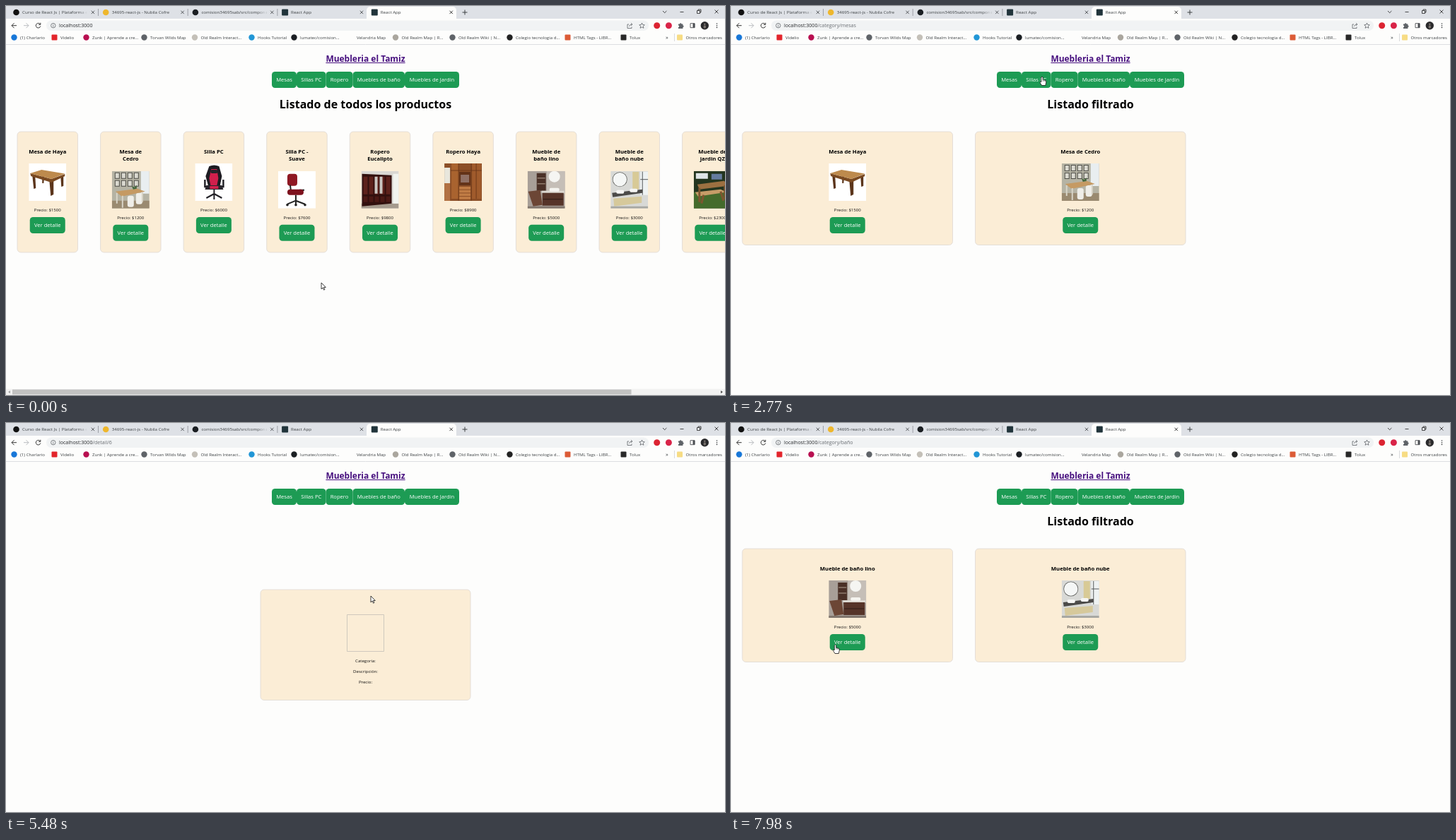
Recreate the animation shown at these times as an HTML page with a canvas. Size 1017 by 551 pixels, loop 8000 ms.

```html
<!DOCTYPE html>
<html lang="es">
<head>
<meta charset="utf-8">
<title>Tienda de muebles</title>
<style>
  html, body { margin: 0; width: 100%; height: 100%; overflow: hidden; background: #fdfdfc; }
  canvas { display: block; width: 1017px; height: 551px; }
</style>
</head>
<body>
<canvas id="stage"></canvas>
<script>
const W = 1017, H = 551, LOOP = 8000;
const canvas = document.getElementById('stage');
const ctx = canvas.getContext('2d');
const ratio = window.devicePixelRatio || 1;
canvas.width = W * ratio;
canvas.height = H * ratio;

const PAGE = '#fdfdfc', GREEN = '#1d9b54', CREAM = '#fbedd6', INK = '#3c4043';

// Drawing helpers
function box(color, x, y, w, h, r = 0) {
  ctx.fillStyle = color;
  ctx.beginPath();
  ctx.roundRect(x, y, w, h, r);
  ctx.fill();
}
function dot(color, x, y, r) {
  ctx.fillStyle = color;
  ctx.beginPath();
  ctx.arc(x, y, r, 0, Math.PI * 2);
  ctx.fill();
}
function shape(color, d) {
  ctx.fillStyle = color;
  ctx.fill(new Path2D(d));
}
function line(d, color = INK, width = 1) {
  ctx.strokeStyle = color;
  ctx.lineWidth = width;
  ctx.stroke(new Path2D(d));
}
// y is the middle of the capital letters
function text(str, x, y, size, { color = '#111', weight = 400, align = 'left' } = {}) {
  ctx.font = `${weight} ${size}px "Open Sans", "Noto Sans", sans-serif`;
  ctx.fillStyle = color;
  ctx.textAlign = align;
  ctx.fillText(str, x, y + size * 0.357);
  return ctx.measureText(str).width;
}
const centred = (str, x, y, size, weight = 400, color = '#111') =>
  text(str, x, y, size, { color, weight, align: 'center' });

// Product pictures on a 53 x 53 square
const photos = {
  table() {
    box('#fff', 0, 0, 53, 53);
    shape('#5b351b', 'M5 17l4 1 1 17-3 1zM29 23l6 0 0 21-4 2zM45 18l4-1 0 15-3 1zM19 18h3l-1 10h-2z');
    shape('#7a4a22', 'M2 14L32 22L51 15V18L32 27L3 18z');
    shape('#bd8a4d', 'M2 14L18 9L51 14.500L32 22z');
  },
  dining() {
    box('#b5b3a4', 0, 0, 53, 53);
    box('#e9eef0', 41, 0, 12, 32);
    for (let i = 0; i < 8; i++) {
      const x = 4 + i % 4 * 9, y = 2 + (i >> 2) * 11;
      box('#4e4d47', x, y, 7, 9);
      box('#dad9d0', x + 1, y + 1, 5, 7);
    }
    box('#9a8a70', 0, 42, 53, 11);
    box('#efeee8', 34, 31, 9, 16, 3);
    box('#efeee8', 22, 35, 9, 16, 3);
    shape('#c59a63', 'M5 29L36 25L47 29L14 36z');
    line('M15 35V52M7 31V46M43 30V44', '#d9d5c8', 2);
    shape('#46683e', 'M30 26l-2-5 4 2 3-3 0 5z');
  },
  gaming() {
    box('#fff', 0, 0, 53, 53);
    shape('#1d1c22', 'M20 4Q27 1 34 4L38 18L35 33H19L15 18z');
    shape('#d11f4c', 'M23 8H31L33 21L31 31H22L20 21z');
    box('#25242a', 22, 9, 10, 5, 2);
    line('M14 23V33H20M40 23V33H34', '#1d1c22', 2.4);
    shape('#2a272e', 'M16 31H38L40 37H14z');
    box('#d11f4c', 21, 32, 12, 4);
    line('M27 37V45M27 43L16 49M27 43L38 49M27 43V51', '#222127', 2);
  },
  office() {
    box('#fff', 0, 0, 53, 53);
    box('#8f1823', 13, 4, 14, 17, 4);
    line('M17 20L18 28M30 27H37', '#222', 2);
    box('#7d111d', 13, 26, 23, 8, 4);
    line('M25 34V43M25 42L13 47M25 42L38 47M25 42V49', '#222', 2);
    [13, 25, 38].forEach(x => dot('#222', x, 48, 1.8));
  },
  darkWardrobe() {
    box('#d9d7d2', 0, 0, 53, 53);
    box('#a59a8d', 0, 46, 53, 7);
    box('#f1f3ee', 45, 4, 8, 42);
    shape('#32100e', 'M1 4L43 6V46L1 50z');
    for (let i = 0; i < 5; i++) box('#5d211b', 3 + i * 8, 8, 6, 25);
    box('#c9c5c0', 19, 8, 4, 24);
    box('#c9c5c0', 26, 8, 4, 24);
    for (let i = 0; i < 5; i++) box('#4b1915', 3 + i * 8, 36, 6, 8);
  },
  pineWardrobe() {
    box('#8c4f27', 0, 0, 53, 53);
    box('#e8e6dc', 0, 6, 8, 22);
    box('#b27143', 0, 28, 8, 25);
    box('#a9632f', 10, 0, 10, 50);
    box('#a05b2c', 39, 0, 13, 50);
    box('#633319', 21, 12, 16, 19);
    box('#907065', 23, 16, 12, 11);
    for (let i = 0; i < 4; i++) box('#c07c45', 21, 33 + i * 4.7, 16, 3.7);
    line('M20 0V53M38 0V53M45 0V50M9 10H53', '#653417', 0.8);
  },
  brownBath() {
    box('#a89f98', 0, 0, 53, 53);
    box('#c5beb7', 27, 0, 26, 32);
    dot('#f5f5f2', 38, 8, 8);
    box('#4a3027', 13, 3, 13, 25);
    line('M14 10H25M14 18H25', '#8f7b6d', 1.5);
    box('#ddd9d2', 20, 28, 32, 3);
    box('#f4f3ef', 31, 24, 14, 5, 2);
    box('#563429', 21, 31, 30, 18);
    line('M22 40H50', '#2f1c17', 1);
    shape('#6c4635', 'M1 29L18 27L21 48L8 50z');
    box('#81766d', 0, 50, 53, 3);
  },
  lightBath() {
    box('#d8d9d6', 0, 0, 53, 53);
    box('#d8ca96', 31, 1, 9, 25);
    box('#eef2f2', 42, 1, 11, 33);
    line('M45 1V34M53 12H42', '#55585a', 1);
    dot('#62635f', 13, 12, 10.5);
    dot('#f5f7f6', 13, 12, 9.7);
    shape('#4c4b49', 'M2 31L45 26V31L3 37z');
    box('#f6f6f4', 8, 27, 11, 5, 2);
    box('#f6f6f4', 27, 25, 11, 5, 2);
    shape('#d6c99b', 'M4 39L44 36V45L5 50z');
    box('#a8a8a3', 0, 50, 53, 3);
  },
  garden() {
    box('#24351f', 0, 0, 53, 53);
    box('#446b2c', 0, 30, 53, 23);
    box('#dfe5e7', 3, 3, 17, 8);
    box('#657b9e', 25, 4, 15, 8);
    shape('#9c7041', 'M5 19L43 14L49 21L8 26z');
    shape('#c69c68', 'M2 30L38 26L47 30L6 36z');
    line('M8 24V44M44 20V40M14 34L11 46M38 29L42 42', '#7e5630', 3);
  }
};

const products = [
  ['Mesa de Haya', 1500, 'table'],
  ['Mesa de|Cedro', 1200, 'dining'],
  ['Silla PC', 6000, 'gaming'],
  ['Silla PC -|Suave', 7600, 'office'],
  ['Ropero|Eucalipto', 9800, 'darkWardrobe'],
  ['Ropero Haya', 8900, 'pineWardrobe'],
  ['Mueble de|baño lino', 5000, 'brownBath'],
  ['Mueble de|baño nube', 3000, 'lightBath'],
  ['Mueble de|jardin QZ', 2300, 'garden']
].map(([name, price, photo]) => ({ name, price, photo }));

const ALL = 'Listado de todos los productos', FILTERED = 'Listado filtrado';
const every = products.map((_, i) => i);
const views = [
  { at: 0, path: '', head: ALL, items: every },
  { at: 1670, path: '/category/mesas', head: FILTERED, items: every },
  { at: 2370, path: '/category/mesas', head: FILTERED, items: [0, 1] },
  { at: 2800, path: '/category/sillas', head: FILTERED, items: [0, 1] },
  { at: 3500, path: '/category/sillas', head: FILTERED, items: [2, 3] },
  { at: 3650, path: '/category/ropero', head: FILTERED, items: [2, 3] },
  { at: 4300, path: '/category/ropero', head: FILTERED, items: [4, 5] },
  { at: 5040, path: '/detail/6', detail: true },
  { at: 5740, path: '/detail/6', detail: true, product: products[5] },
  { at: 6950, path: '/category/baño', head: FILTERED, items: [] },
  { at: 7650, path: '/category/baño', head: FILTERED, items: [6, 7] }
];

// Pointer stops: time, x, y
const route = [
  [0, 446, 392], [450, 446, 386], [840, 424, 345], [940, 341, 157], [1020, 337, 140],
  [1250, 392, 104], [1470, 394, 99], [2540, 394, 99], [2770, 440, 100], [3330, 440, 100],
  [3560, 470, 104], [4300, 470, 104], [4570, 514, 292], [4750, 494, 310], [5040, 494, 310],
  [5480, 516, 245], [5800, 560, 270], [6600, 560, 270], [6900, 538, 105], [7650, 538, 105],
  [7970, 147.5, 314], [LOOP, 147.5, 314]
];

const nav = [
  ['Mesas', 376, 411], ['Sillas PC', 411, 452.5], ['Ropero', 452.5, 490.5],
  ['Muebles de baño', 490.5, 564], ['Muebles de Jardin', 564, 641]
];
let links = [];

function photo(name, x, y) {
  ctx.save();
  ctx.translate(x, y);
  ctx.beginPath();
  ctx.rect(0, 0, 53, 53);
  ctx.clip();
  photos[name]();
  ctx.restore();
}

function panel(x, y, w, h) {
  box(CREAM, x, y, w, h, 5);
  ctx.strokeStyle = '#dfd9d3';
  ctx.lineWidth = 0.8;
  ctx.stroke();
}

function button(label, x, y, w) {
  box(GREEN, x, y, w, 23, 4.5);
  centred(label, x + w / 2, y + 11.7, 7.6, 400, '#fff');
  links.push([x, y, w, 23]);
}

function card(item, x, w, h, narrow) {
  const mid = x + w / 2;
  const lines = narrow ? item.name.split('|') : [item.name.replace('|', ' ')];
  const drop = (lines.length - 1) * 10.7;
  panel(x, 178, w, h);
  lines.forEach((s, i) => centred(s, mid, 206 + i * 10.7, 7.69, 700, '#000'));
  photo(item.photo, mid - 26.5, 223 + drop);
  centred('Precio: $' + item.price, mid, 288.7 + drop, 6.05);
  button('Ver detalle', mid - 25, 299 + drop, 50);
}

function detail(item) {
  const top = item ? 231 : 236, bottom = item ? 398 : 392.5;
  const shift = item ? 5 : 0;
  panel(360, top, 297, bottom - top);
  if (item) {
    centred(item.name, 508.5, 259, 7.69, 700, '#000');
    photo(item.photo, 482, 276);
  } else {
    line('M482.500 271.500h52v52h-52z', '#c4bfb8', 0.8);
  }
  const rows = item
    ? ['Categoria: ropero', 'Descripción: Ropero de madera', 'Precio: $' + item.price]
    : ['Categoria:', 'Descripción:', 'Precio:'];
  rows.forEach((s, i) => centred(s, 508.5, 337 + shift + i * 14.8, 6.1));
}

function tabs() {
  box('#dee1e6', 0, 0, W, 18);
  box(PAGE, 510, 1, 127, 20, [5, 5, 0, 0]);
  const titles = ['Curso de React Js | Plataforma e', '34695-react-js - Nubila Cofre',
    'comision34695sab/src/compone', 'React App', 'React App'];
  titles.forEach((title, i) => {
    const x = 10 + i * 126.7, active = i === 4;
    if (i > 2) box('#21343b', x, 4.5, 9, 9, 1);
    else dot(['#111', '#eeb72d', '#1b1f23'][i], x + 4.5, 9, 4.3);
    ctx.save();
    ctx.beginPath();
    ctx.rect(x + 12, 0, 93, 18);
    ctx.clip();
    text(title, x + 13, 9, 6.17, { color: INK });
    ctx.restore();
    if (i < 3) {
      const fade = ctx.createLinearGradient(x + 92, 0, x + 105, 0);
      fade.addColorStop(0, '#dee1e600');
      fade.addColorStop(1, '#dee1e6');
      box(fade, x + 92, 2, 13, 14);
      line(`M${x + 120.5} 4V14`, '#8d9197', 0.8);
    }
    line(`M${x + 110.7} 6.700l4.400 4.400m0-4.400l-4.400 4.400`, active ? '#222' : '#4a4d51', 0.9);
  });
  line('M645.500 9h7M649 5.500v7', INK, 1);
  line('M929 7l2.700 2.700l2.700-2.700M953.500 8.500h5M1002.500 5.500l5 5m0-5l-5 5', '#222', 0.8);
  line('M977.500 6.500h4v4h-4zM979 6.500v-1.500h4v4h-1.500', '#222', 0.8);
}

function toolbar(path) {
  box(PAGE, 0, 18, W, 36);
  line('M8 27.700h7M11.500 24.200l-3.500 3.500l3.500 3.500', '#333', 1);
  line('M25 27.700h7M28.500 24.200l3.500 3.500l-3.500 3.500', '#b9bcc0', 1);
  line('M48.300 25.800A3.300 3.300 0 1 0 48.800 28.500M48.800 23.800v2.600h-2.600', '#333', 1);
  box('#f1f3f4', 57, 20.5, 852, 14.5, 7.2);
  line('M70 27.700a3.200 3.200 0 1 1-6.400 0a3.200 3.200 0 1 1 6.400 0M66.800 27.200v2.300M66.800 25.600v.8', '#5f6368', 0.8);
  const w = text('localhost:3000', 75, 27.7, 7.04, { color: '#26282b' });
  text(path, 75 + w, 27.7, 7.04, { color: '#6a6e73' });
  line('M881 26h-2v5.500h6v-2M881.500 29q.5-3 4-3m-1.500-1.800l2 1.800l-2 1.800', '#5f6368', 0.8);
  line('M899.500 24l1.100 2.500 2.700.3-2 1.800.6 2.700-2.400-1.400-2.400 1.400.6-2.700-2-1.800 2.700-.3z', '#5f6368', 0.8);
  dot('#dc2432', 920.7, 27.7, 4.5);
  dot('#d92448', 937.4, 27.7, 4.5);
  shape('#5f6368', 'M951 25.500h2a1.200 1.200 0 0 1 2.400 0h2v2a1.200 1.200 0 0 1 0 2.400v2h-6.400v-2a1.200 1.200 0 0 0 0-2.400z');
  line('M968 24.700h6v6h-6z', '#4c4f53', 0.9);
  box('#4c4f53', 971.5, 24.7, 2.8, 6);
  dot('#29292b', 988.3, 27.7, 5.7);
  dot('#77706c', 988.3, 25.8, 1.3);
  box('#77706c', 986.7, 27.4, 3.2, 4, 1);
  [25, 27.7, 30.4].forEach(y => dot(INK, 1005.5, y, 0.8));
}

function bookmarks() {
  const marks = [
    ['(1) Charlario', 20, '#1877d8'], ['Videlio', 77, '#e3242b', true],
    ['Zunk | Aprende a cre...', 122, '#b80f50'], ['Torvan Wilds Map', 204, '#5f6368'],
    ['Old Realm Interact...', 275.5, '#c4c0b8'], ['Hooks Tutorial', 356, '#2196d6'],
    ['lumatec/comision...', 416, '#1b1f23'], ['Velandria Map', 496],
    ['Old Realm Map | R...', 559.5, '#aaa69e'], ['Old Realm Wiki | N...', 640, '#5f6368'],
    ['Colegio tecnologia d...', 721, '#222'], ['HTML Tags - LIBR...', 803, '#dc5b36', true],
    ['Tolux', 882, '#282828', true], ['Otros marcadores', 961.5, '#f7dc84', true]
  ];
  for (const [label, x, color, square] of marks) {
    if (color && square) box(color, x - 12.5, 40.5, 8, 8, 1);
    else if (color) dot(color, x - 8.5, 44.5, 4.2);
    text(label, x, 44.5, 6.12, { color: INK });
  }
  text('»', 933, 44, 7.5, { color: INK });
  line('M945.500 39V50', '#cfd1d4', 0.8);
  line('M0 54.500H1017', '#dcdee1', 1);
}

function scrollbar() {
  box('#f1f1f1', 0, 542.5, W, 8.5);
  box('#c1c1c1', 9, 543.2, 875.5, 7);
  shape('#a3a3a3', 'M3 546.700l3-2v4z');
  shape('#505050', 'M1014 546.700l-3-2v4z');
}

function page(view) {
  links = [[452, 67, 113, 16]];
  const w = centred('Muebleria el Tamiz', 508.5, 74.5, 11.98, 700, '#47107f');
  box('#47107f', 508.5 - w / 2, 80, w, 1);
  for (const [label, left, right] of nav) button(label, left, 93, right - left);
  if (view.detail) return detail(view.product);
  centred(view.head, 508.5, 139.7, 16.05, 700, '#000');
  const narrow = view.items.length > 2;
  view.items.forEach((id, i) => {
    if (narrow) card(products[id], 16 + i * 117.57, 85.5, 171, true);
    else card(products[id], 16 + i * 329.5, 297.5, 160.5, false);
  });
  if (narrow) scrollbar();
}

function pointerAt(t) {
  const i = Math.max(1, route.findIndex(stop => stop[0] > t));
  const [t0, x0, y0] = route[i - 1], [t1, x1, y1] = route[i];
  const p = (t - t0) / (t1 - t0), e = p * p * (3 - 2 * p);
  return [x0 + (x1 - x0) * e, y0 + (y1 - y0) * e];
}

const ARROW = 'M0 0V9L2.100 7L3.500 10.200L4.900 9.600L3.500 6.500H6.300Z';
const HAND = 'M-1.200 1Q0-1 1.200 1V4.300L4.800 5.200Q6 5.600 5.800 8L4.800 12.500H-.5L-3 8.400Q-3.200 6.500-1.200 7.700Z';

function pointer(t) {
  const [x, y] = pointerAt(t);
  const over = links.some(([l, top, w, h]) => x >= l && x <= l + w && y >= top && y <= top + h);
  ctx.save();
  ctx.translate(x, y);
  ctx.lineJoin = 'round';
  const d = over ? HAND : ARROW;
  shape('#fff', d);
  line(d, '#111', 0.8);
  if (over) line('M1.200 4.500V7M2.900 5V7M4.500 5.400V7', '#333', 0.5);
  ctx.restore();
}

function draw(t) {
  ctx.setTransform(ratio, 0, 0, ratio, 0, 0);
  box(PAGE, 0, 0, W, H);
  const view = views.findLast(v => v.at <= t);
  tabs();
  toolbar(view.path);
  bookmarks();
  page(view);
  pointer(t);
}

const start = performance.now();
function tick() {
  draw((performance.now() - start) % LOOP);
  requestAnimationFrame(tick);
}
tick();
</script>
</body>
</html>
```
